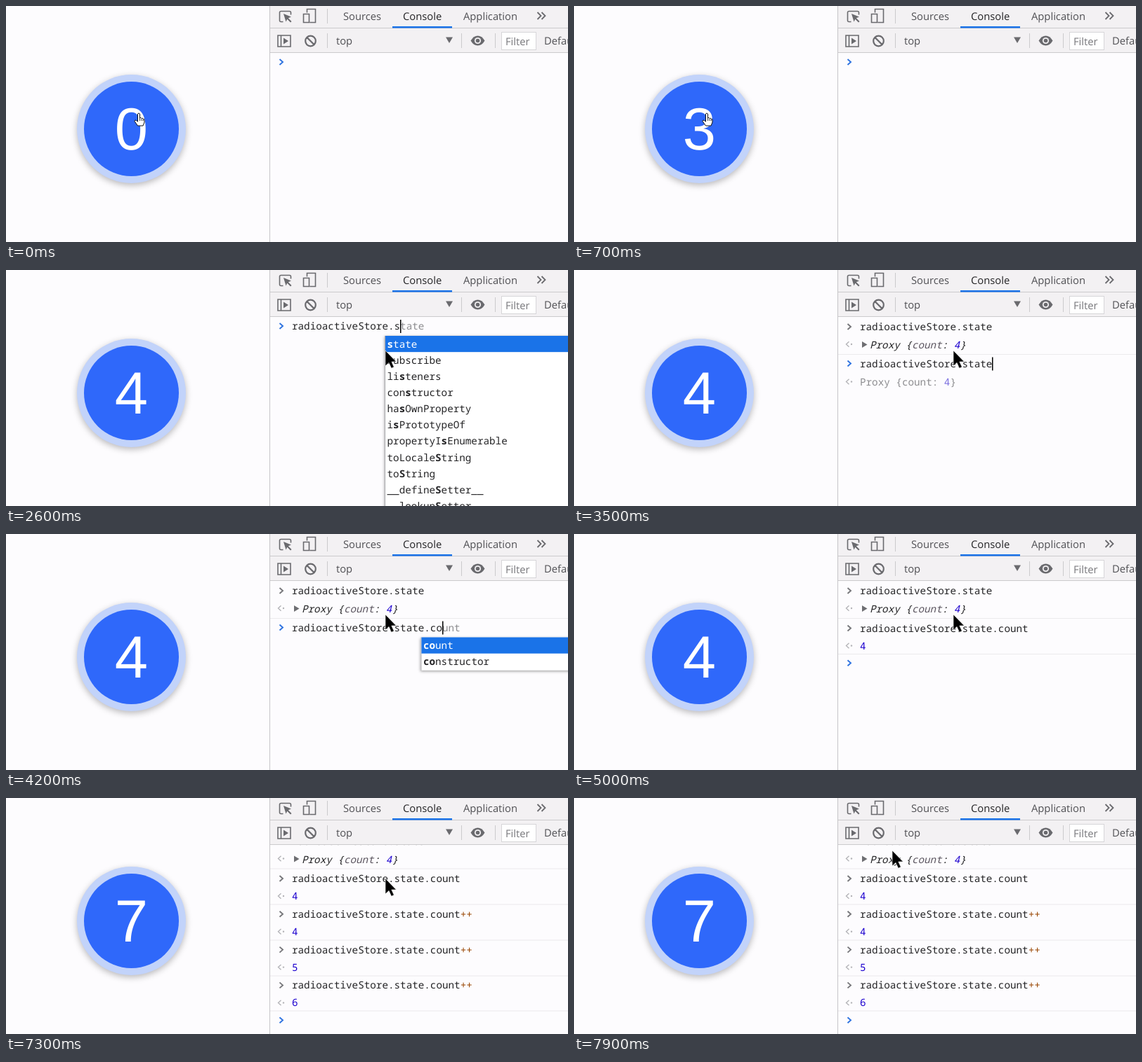
Write an HTML page with a canvas that moves like this. It is 800 px wide and 337 px high and loops after 8000 ms.

```html
<!DOCTYPE html>
<html lang="en">
<head>
<meta charset="utf-8">
<title>Counter and console</title>
<style>
html, body { margin: 0; width: 100%; height: 100%; overflow: hidden; background: #fdfcfe; }
canvas { display: block; }
</style>
</head>
<body>
<canvas id="stage" width="800" height="337"></canvas>
<script>
const c = document.getElementById('stage').getContext('2d');
c.textRendering = 'geometricPrecision';

const LOOP = 8000, CHAR = 8.567, LEFT = 407, ROW = 23.15;
const BG = '#fdfcfe', INK = '#242426', ICON = '#6a6a6e', BLUE = '#1a73e8', NUM = '#1c00cf';
const MONO = "14.27px 'Noto Sans Mono', 'DejaVu Sans Mono', monospace";
const SANS = "14.75px 'Open Sans', 'Noto Sans', sans-serif";
const STORE = 'radioactiveStore', STATE = STORE + '.state', COUNT = STATE + '.count', INC = COUNT + '++';

// Suggestions by the expression in front of the word being typed
const inherited = ['constructor', 'hasOwnProperty', 'isPrototypeOf', 'propertyIsEnumerable',
  'toLocaleString', 'toString', '__defineSetter__', '__lookupSetter__', 'valueOf'];
const suggestions = {
  '': [STORE, 'removeEventListener', 'requestAnimationFrame', 'requestIdleCallback', 'resizeBy', 'resizeTo',
    'RadioNodeList', 'Range', 'RangeError', 'ReadableStream', 'ReferenceError', 'Reflect'],
  [STORE]: ['state', 'subscribe', 'listeners', ...inherited],
  [STATE]: ['count', ...inherited]
};

// Prompt contents: time, text, whether suggestions are open
const typing = [
  [0, ''], [1900, 'r', 1], [2000, 'ra', 1], [2100, 'rad', 1], [2200, 'radi', 1], [2300, STORE],
  [2400, STORE + '.', 1], [2500, STORE + '.s', 1], [2800, STATE], [3000, ''], [3300, STATE],
  [3700, STATE + '.', 1], [3900, STATE + '.c', 1], [4100, STATE + '.co', 1], [4300, STATE + '.cou', 1],
  [4600, COUNT], [4800, ''], [5200, COUNT], [5500, COUNT + '+'], [5700, INC], [5900, ''],
  [6700, INC], [6900, ''], [7100, INC], [7300, '']
];
const log = [[3000, STATE, ''], [4800, COUNT, '4'], [5900, INC, '4'], [6900, INC, '5'], [7300, INC, '6']];
const bumps = [200, 400, 600, 800, 5900, 6900, 7300];

function text(str, x, y, color = INK, font = MONO) {
  c.font = font;
  c.fillStyle = color;
  c.fillText(str, x, y);
  return x + c.measureText(str).width;
}
function rect(x, y, w, h, color) {
  c.fillStyle = color;
  c.fillRect(x, y, w, h);
}
function disc(x, y, r, color) {
  c.fillStyle = color;
  c.beginPath();
  c.arc(x, y, r, 0, 7);
  c.fill();
}
function path(d, x, y, { fill, stroke, width = 1 }) {
  const p = new Path2D(d);
  c.save();
  c.translate(x, y);
  if (fill) { c.fillStyle = fill; c.fill(p); }
  if (stroke) { c.strokeStyle = stroke; c.lineWidth = width; c.stroke(p); }
  c.restore();
}
function shadow(blur, dy, alpha) {
  c.shadowBlur = blur;
  c.shadowOffsetY = dy;
  c.shadowColor = `rgba(0,0,0,${alpha})`;
}

function button(t) {
  c.save();
  shadow(10, 3, 0.27);
  disc(178.5, 175.5, 77.5, '#c2d3fa');
  c.restore();
  disc(178.5, 175.5, 67.5, '#2f68fa');
  c.textAlign = 'center';
  text(bumps.filter(b => b <= t).length, 178.5, 205, '#fff', "85px 'Liberation Sans', Arial, sans-serif");
  c.textAlign = 'left';
}

function toolbar() {
  rect(376, 0, 424, 67, '#f3f1f3');
  rect(376, 31, 424, 1, '#cbcacc');
  rect(376, 66, 424, 1, '#cbcacc');
  rect(550, 29, 85, 2.5, BLUE);
  for (const [x, y] of [[457, 4], [457, 39], [648, 39], [696, 39]]) rect(x, y, 1, 21, '#cbcacc');

  text('Sources', 480, 20, '#505054', SANS);
  text('Console', 565, 20, INK, SANS);
  text('Application', 651, 20, '#505054', SANS);
  text('top', 470, 55, '#505054', SANS);
  rect(705, 37, 50, 26, '#d6d5d8');
  rect(706, 38, 48, 24, '#fff');
  text('Filter', 711, 55.5, '#77777b', SANS);
  text('Default levels', 766, 55, '#505054', SANS);

  const line = { stroke: ICON, width: 1.6 };
  path('M5 15H2Q0 15 0 13V2Q0 0 2 0H14Q16 0 16 2V5', 389.5, 7.5, line);
  path('M0 0L11 4.5L6.8 6.3L11.5 11L10 12.5L5.3 7.8L3.5 11.5Z', 395, 11, { fill: ICON });
  path('M5 5V0H17V19H9M0 7H8V19H0Z', 423.5, 4.5, line);
  path('M0 0L5 5L0 10M6 0L11 5L6 10', 756.5, 9, { stroke: ICON, width: 1.8 });
  path('M0 0H18V16H0ZM4.5 0V16', 387, 42, line);
  path('M0 0L7 4.5L0 9Z', 395, 45.5, { fill: ICON });
  path('M-7.3 0A7.3 7.3 0 1 1 7.3 0A7.3 7.3 0 1 1 -7.3 0M-5 -5L5 5', 433.5, 50, { stroke: ICON, width: 2.2 });
  path('M0 0H10L5 8.5Z', 626, 44.5, { fill: ICON });
  path('M-10 0Q-6 -7 0 -7T10 0Q6 7 0 7T-10 0Z', 671.5, 49.5, { fill: ICON });
  disc(671.5, 49.5, 4.6, '#f3f1f3');
  disc(671.5, 49.5, 2.8, ICON);
}

function chevron(y, color) {
  path('M0 -4L4.5 0L0 4', 389.5, y, { stroke: color, width: 1.9 });
}
function returnMark(y) {
  path('M4 -3.7L0 0L4 3.7', 387.5, y, { stroke: '#b4b4b8', width: 1.4 });
  disc(395, y, 1.2, '#b4b4b8');
}
function command(str, y) {
  const code = str.replace(/\++$/, '');
  return text(str.slice(code.length), text(code, LEFT, y + 5), y + 5, '#994500');
}
function proxy(x, y, faded) {
  const font = faded ? MONO : 'italic ' + MONO;
  const dark = faded ? '#8d8d90' : INK;
  x = text('Proxy {', x, y, dark, font);
  x = text('count', x, y, faded ? dark : '#5c5660', font);
  x = text(': ', x, y, dark, font);
  x = text('4', x, y, faded ? '#7b6fe0' : NUM, font);
  text('}', x, y, dark, font);
}

const entryY = i => i ? 134.5 + 50.8 * (i - 1) : 81;

function entry([, code, result], i) {
  const y = entryY(i);
  chevron(y, '#77777b');
  command(code, y);
  returnMark(y + 25);
  if (result) {
    text(result, LEFT, y + 30, NUM);
  } else {
    path('M0 0L7.5 4.5L0 9Z', 410, y + 21, { fill: '#6e6e72' });
    proxy(421, y + 31);
  }
  rect(376, Math.round(y + (i ? 36.5 : 39)), 424, 1, '#ebeaed');
}

function popup(x, y, items, word) {
  const h = items.length * ROW + 1;
  c.save();
  shadow(4, 1, 0.4);
  rect(x, y, 300, h, '#fff');
  c.restore();
  rect(x, y, 1, h, '#a9a9ad');
  rect(x + 1, y, 300, ROW, BLUE);
  items.forEach((item, i) => {
    const at = item.toLowerCase().indexOf(word), end = at + word.length;
    const base = y + ROW * i + 16.5, color = i ? INK : '#fff';
    let tx = text(item.slice(0, at), x + 3.5, base, color);
    tx = text(item.slice(at, end), tx, base, color, 'bold ' + MONO);
    text(item.slice(end), tx, base, color);
  });
}

function prompt(t, y) {
  const [, str, open] = typing.findLast(s => s[0] <= t);
  chevron(y, '#2f73e0');
  const end = command(str, y);
  if (open) {
    const dot = str.lastIndexOf('.');
    const word = str.slice(dot + 1);
    const items = suggestions[str.slice(0, Math.max(dot, 0))].filter(s => s.toLowerCase().includes(word));
    if (word) text(items[0].slice(word.length), end, y + 5, '#8d8d90');
    popup(LEFT + CHAR * (dot + 1) - 13.6, y + 14, items, word);
  } else if (str === STATE || str === COUNT) {
    returnMark(y + 26);
    if (str === STATE) proxy(LEFT, y + 31, true);
    else text('4', LEFT, y + 31, '#7b6fe0');
  }
  if (str || (t >= 1500 && t < 1900)) rect(Math.round(end), y - 9, 1.5, 19, '#000');
}

function terminal(t) {
  const done = log.filter(e => e[0] <= t);
  c.save();
  c.beginPath();
  c.rect(376, 67, 424, 270);
  c.clip();
  if (done.length === log.length) c.translate(0, -19.5);
  done.forEach(entry);
  prompt(t, entryY(done.length) - 1);
  c.restore();
}

function ease(t, from, to) {
  const k = Math.min(1, Math.max(0, (t - from) / (to - from)));
  return k * k * (3 - 2 * k);
}
function pointer(t) {
  const a = ease(t, 1000, 1400), b = ease(t, 7400, 7800);
  const x = 189 + 351 * a - 87 * b, y = 153 - 38 * a - 40 * b;
  if (Math.hypot(x - 178.5, y - 175.5) < 77.5) {
    path('M-1.5 1Q0 -1 1.5 1V7Q3 5.5 4 7.5Q5.5 6.5 6.3 8.3Q8 7.5 8 10V13L6 18H-1.5L-6 11.5Q-5.5 9 -3.5 10.5L-1.5 12Z',
      x, y, { fill: '#fff', stroke: '#111' });
    path('M1.5 7V11M4 8V11M6.2 9V11', x, y, { stroke: '#111', width: 0.8 });
  } else {
    path('M0 0V22L5 17.4L8.6 25.3L12.3 23.6L8.8 16H15.5Z', x, y, { fill: '#000', stroke: '#fff', width: 0.6 });
  }
}

function draw(now) {
  const t = now % LOOP;
  rect(0, 0, 800, 337, BG);
  button(t);
  rect(375, 0, 1, 337, '#c6c5c8');
  toolbar();
  terminal(t);
  pointer(t);
  requestAnimationFrame(draw);
}
requestAnimationFrame(draw);
</script>
</body>
</html>
```
